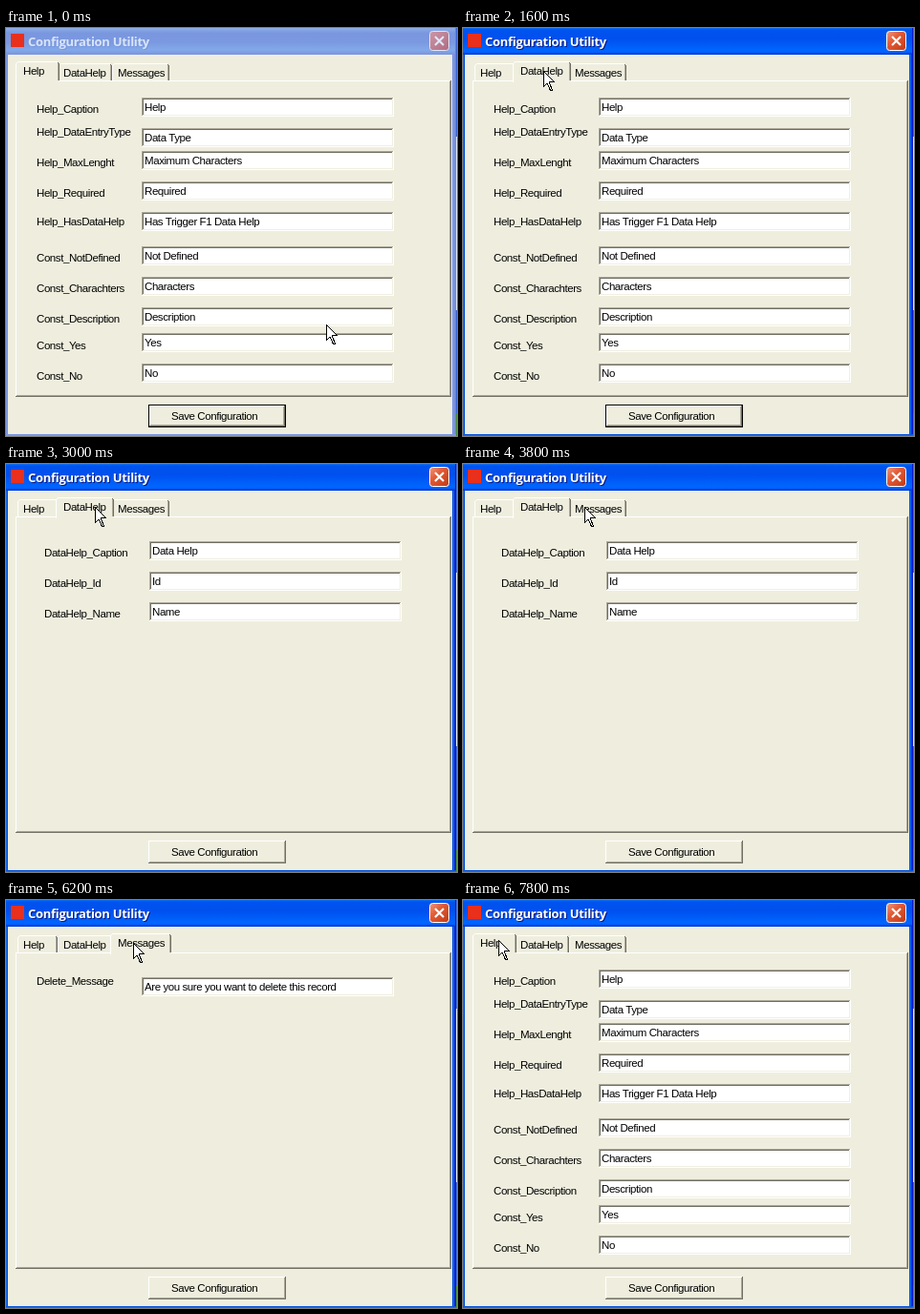
These frames come from a looping animation (472x428 px, 8.4 s). An HTML page:

```html
<!DOCTYPE html>
<html lang="en">
<head>
<meta charset="utf-8">
<title>Configuration Utility</title>
<style>
  html, body { margin: 0; width: 100%; height: 100%; overflow: hidden; background: #efeede; }
  svg { display: block; width: 472px; height: 428px; shape-rendering: crispEdges; cursor: default; }
  text { font: 11.5px "Liberation Sans", Arial, sans-serif; letter-spacing: -.42px; fill: #000; }
  .title { font: 700 13px "Open Sans", "Noto Sans", sans-serif; letter-spacing: -.3px; }
</style>
</head>
<body>
<svg id="stage" viewBox="0 0 472 428">
  <defs>
    <linearGradient id="barOn" x2="0" y2="1">
      <stop offset="0" stop-color="#0a6cf4"/>
      <stop offset=".08" stop-color="#0053ee"/>
      <stop offset=".4" stop-color="#0050ee"/>
      <stop offset=".86" stop-color="#0066ff"/>
      <stop offset=".92" stop-color="#005bff"/>
      <stop offset=".96" stop-color="#003dd7"/>
      <stop offset="1" stop-color="#003dd7"/>
    </linearGradient>
    <linearGradient id="barOff" x2="0" y2="1">
      <stop offset="0" stop-color="#94afe8"/>
      <stop offset=".08" stop-color="#82a5e4"/>
      <stop offset=".2" stop-color="#7996de"/>
      <stop offset=".55" stop-color="#7b99e1"/>
      <stop offset=".82" stop-color="#82a9e9"/>
      <stop offset="1" stop-color="#7a93df"/>
    </linearGradient>
    <linearGradient id="closeOn" x2="1" y2="1">
      <stop offset="0" stop-color="#f09a80"/>
      <stop offset=".4" stop-color="#e25a36"/>
      <stop offset="1" stop-color="#c03a14"/>
    </linearGradient>
    <linearGradient id="closeOff" x2="1" y2="1">
      <stop offset="0" stop-color="#cc98a8"/>
      <stop offset="1" stop-color="#b06a80"/>
    </linearGradient>
  </defs>
</svg>
<script>
const LOOP = 8400, STEP = 200;
const FACE = '#efeede', LIGHT = '#fff', SHADE = '#aca899', DARK = '#716f64';
const stage = document.getElementById('stage');

function add(parent, tag, attrs, content) {
  const el = document.createElementNS('http://www.w3.org/2000/svg', tag);
  for (const key in attrs) el.setAttribute(key, attrs[key]);
  if (content) el.textContent = content;
  return parent.appendChild(el);
}
const group = parent => add(parent, 'g', {});
const rect = (p, x, y, width, height, fill) => add(p, 'rect', { x, y, width, height, fill });
const label = (p, x, y, str, attrs) => add(p, 'text', { x, y, ...attrs }, str);
const show = (el, on) => el.setAttribute('visibility', on ? 'visible' : 'hidden');

// Two-pixel 3D edge: outer and inner colours for top-left and bottom-right.
function bevel(p, x, y, w, h, fill, [tl, tlIn, brIn, br]) {
  rect(p, x, y, w, h, br);
  rect(p, x, y, w - 1, h - 1, tl);
  rect(p, x + 1, y + 1, w - 2, h - 2, brIn);
  rect(p, x + 1, y + 1, w - 3, h - 3, tlIn);
  rect(p, x + 2, y + 2, w - 4, h - 4, fill);
}

// mid values are the vertical centres of label and field
function row(p, x, name, nameMid, value, mid) {
  label(p, x, nameMid + 4, name);
  bevel(p, x + 110, mid - 10, 264, 20, '#fff', [SHADE, DARK, '#f1efe2', LIGHT]);
  label(p, x + 113, mid + 4, value);
}

function tab(p, x1, x2, name, textX, active) {
  const top = active ? 35 : 37, bottom = active ? 57 : 55;
  rect(p, x1, top + 2, x2 - x1, bottom - top - 2, FACE);
  rect(p, x1, top + 2, 1, bottom - top - 2, LIGHT);
  rect(p, x1 + 1, top + 1, 1, 1, LIGHT);
  rect(p, x1 + 2, top, x2 - x1 - 4, 1, LIGHT);
  rect(p, x1 + 2, top + 1, x2 - x1 - 4, 1, FACE);
  rect(p, x2 - 2, top + 2, 1, 53 - top, SHADE);
  rect(p, x2 - 2, top + 1, 1, 1, DARK);
  rect(p, x2 - 1, top + 2, 1, 53 - top, DARK);
  label(p, textX, active ? 49 : 51, name);
}

// Title bar, close button and borders; edges run from the client area outwards
function frame(bar, close, edges, ink, shadow, cross) {
  const g = group(stage);
  const [inner, mid, outer, rim] = edges;
  rect(g, 0, 0, 1, 428, mid);
  rect(g, 1, 0, 1, 428, inner);
  edges.forEach((c, i) => rect(g, 467 + i, 0, 1, 428, c));
  rect(g, 0, 426, 471, 1, inner);
  rect(g, 0, 427, 471, 1, mid);
  rect(g, 0, 0, 470, 28, `url(#${bar})`);
  label(g, 24, 20, 'Configuration Utility', { class: 'title', style: `fill:${shadow}` });
  label(g, 23, 19, 'Configuration Utility', { class: 'title', style: `fill:${ink}` });
  add(g, 'rect', {
    x: 443.5, y: 3.5, width: 20, height: 20, rx: 3, fill: `url(#${close})`, stroke: cross,
    'shape-rendering': 'auto'
  });
  add(g, 'path', {
    d: 'M449 9l9 9m0-9l-9 9', stroke: cross, 'stroke-width': 2.2, 'shape-rendering': 'auto'
  });
  return g;
}

rect(stage, 0, 0, 472, 428, FACE);
rect(stage, 471, 0, 1, 428, '#3a66d0');
rect(stage, 471, 114, 1, 182, '#dfe6f8');
rect(stage, 471, 404, 1, 24, '#4a8a3a');
const idle = frame('barOff', 'closeOff', ['#7b96e1', '#7d9ae4', '#7a90dc', '#6f84d4'],
  '#d8e4f8', '#7996de', '#dfe6f8');
const focused = frame('barOn', 'closeOn', ['#0855dd', '#166aee', '#0831d9', '#0019cf'],
  '#fff', '#0a1883', '#fff');
rect(stage, 5, 6, 14, 14, '#e8301c');

// Tab page
bevel(stage, 10, 55, 456, 332, FACE, [LIGHT, FACE, SHADE, DARK]);

const pages = [0, 1, 2].map(() => group(stage));
[
  ['Help_Caption', 85, 'Help', 83],
  ['Help_DataEntryType', 109, 'Data Type', 115],
  ['Help_MaxLenght', 141, 'Maximum Characters', 139],
  ['Help_Required', 173, 'Required', 171],
  ['Help_HasDataHelp', 203, 'Has Trigger F1 Data Help', 203],
  ['Const_NotDefined', 241, 'Not Defined', 239],
  ['Const_Charachters', 273, 'Characters', 271],
  ['Const_Description', 305, 'Description', 303],
  ['Const_Yes', 333, 'Yes', 330],
  ['Const_No', 365, 'No', 362]
].forEach(r => row(pages[0], 32, ...r));
[
  ['DataHelp_Caption', 93, 'Data Help', 91],
  ['DataHelp_Id', 125, 'Id', 123],
  ['DataHelp_Name', 157, 'Name', 155]
].forEach(r => row(pages[1], 40, ...r));
row(pages[2], 32, 'Delete_Message', 85, 'Are you sure you want to delete this record', 91);

// One tab strip per selected tab; the selected tab is drawn last and larger
const tabs = [[12, 54, 'Help', 18], [54, 111, 'DataHelp', 60], [111, 171, 'Messages', 117]];
const strips = tabs.map(([sx1, sx2, sName, sx], active) => {
  const g = group(stage);
  tabs.forEach(([x1, x2, name, x], i) => {
    if (i !== active) tab(g, x1, x2, name, x, false);
  });
  tab(g, sx1 - 2, sx2 + 2, sName, sx, true);
  return g;
});

// Save button, plain and with the default-button outline
const raised = [LIGHT, FACE, SHADE, DARK];
const plain = group(stage), outlined = group(stage);
bevel(plain, 149, 395, 144, 24, FACE, raised);
rect(outlined, 149, 395, 144, 24, '#000');
bevel(outlined, 150, 396, 142, 22, FACE, raised);
label(stage, 173, 411, 'Save Configuration');

const pointer = add(stage, 'path', {
  d: 'M.5 .5V16.5L4 13L7.5 20.5H9.5L6.5 12.5V11.5H11.5Z', fill: '#fff', stroke: '#000'
});

// Pointer moves: start time, number of steps, target x, target y, easing
const linear = u => u;
const smooth = u => u * u * (3 - 2 * u);
const moves = [
  [200, 6, 84, 44, smooth],
  [1400, 1, 84, 45, linear],
  [3000, 5, 127, 45, linear],
  [4000, 3, 141, 45, linear],
  [6200, 6, 37, 42, smooth]
];

function pointerAt(t) {
  let x = 335, y = 311;
  for (const [start, steps, tx, ty, ease] of moves) {
    if (t < start) break;
    const u = ease(Math.min(1, (Math.floor((t - start) / STEP) + 1) / steps));
    x += (tx - x) * u;
    y += (ty - y) * u;
  }
  return [Math.round(x), Math.round(y)];
}

// Index of the current tab or page, given the times it changes
const pick = (t, a, b, c) => t < a || t >= c ? 0 : t < b ? 1 : 2;

function draw(t) {
  const strip = pick(t, 1600, 4600, 7800);
  const page = pick(t, 1800, 4800, 7800);
  strips.forEach((g, i) => show(g, i === strip));
  pages.forEach((g, i) => show(g, i === page));
  show(idle, t < 1400);
  show(focused, t >= 1400);
  show(outlined, t < 1800);
  show(plain, t >= 1800);
  pointer.setAttribute('transform', `translate(${pointerAt(t)})`);
}

const began = performance.now();
function tick() {
  draw((performance.now() - began) % LOOP);
  requestAnimationFrame(tick);
}
tick();
</script>
</body>
</html>
```
